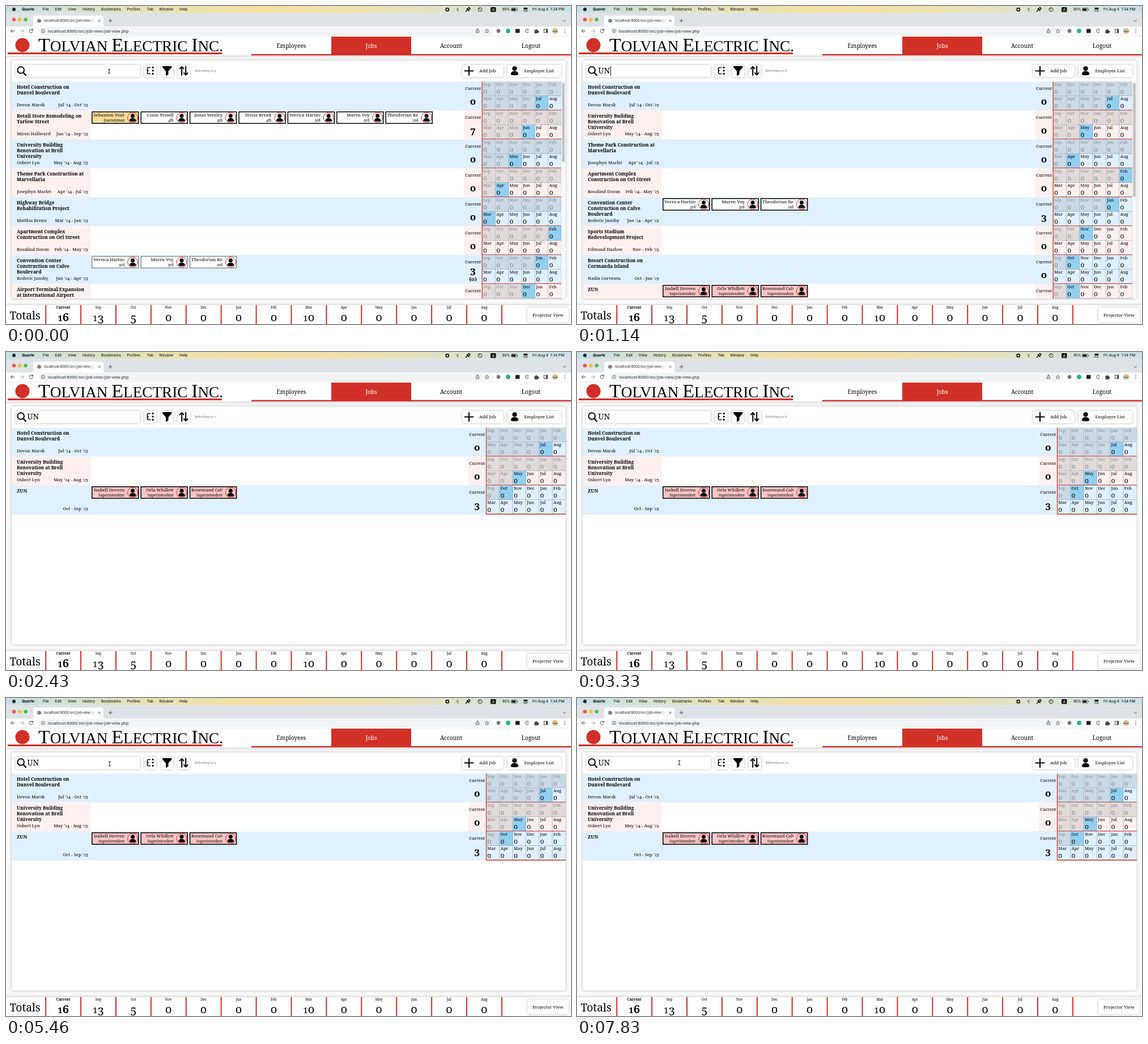
An HTML page that plays this animation: 997x561 px, repeating every 8 s.

```html
<!DOCTYPE html>
<html lang="en">
<head>
<meta charset="utf-8">
<title>Job view</title>
<style>
html, body { margin: 0; width: 100%; height: 100%; overflow: hidden; background: #fff; }
svg { display: block; }
#stage { width: 100vw; height: 100vh; font-family: "Noto Serif", serif; }
text { white-space: pre; }
.ui { font-family: Inter, sans-serif; }
.url { font-family: Roboto, sans-serif; }
.brand { font-family: "Liberation Serif", serif; }
.b { font-weight: 700; }
.soft { filter: drop-shadow(0 0 2px rgba(0,0,0,.28)); }
.line { fill: none; stroke: #000; stroke-linecap: round; stroke-linejoin: round; }
.grey { stroke: #444; }
</style>
</head>
<body>
<svg id="stage" viewBox="0 0 997 561"></svg>
<script>
const RED = '#d03027', LOOP = 8000, ROW = 51, TOP = 133.5;
const MONTHS = 'Sep Oct Nov Dec Jan Feb Mar Apr May Jun Jul Aug'.split(' ');

const stage = document.getElementById('stage');
const rect = (x, y, w, h, fill, more = '') =>
  `<rect x="${x}" y="${y}" width="${w}" height="${h}" fill="${fill}" ${more}/>`;
const dot = (x, y, r, fill, more = '') =>
  `<circle cx="${x}" cy="${y}" r="${r}" fill="${fill}" ${more}/>`;
const line = (d, w = 1, color = '#000') =>
  `<path class="line" d="${d}" style="stroke:${color};stroke-width:${w}"/>`;
const text = (x, y, s, size, more = '') =>
  `<text x="${x}" y="${y}" font-size="${size}" ${more}>${s}</text>`;
const MID = 'text-anchor="middle"', END = 'text-anchor="end"', BOLD = 'class="b"', INK = '#444';

// old-style figures: 0-2 at x-height, 3 4 5 7 9 hang below the baseline
const old = s => String(s).replace(/\d/g, d =>
  d === '0' ? 'o'
  : d < 3 ? `<tspan font-size="76%">${d}</tspan>`
  : d === '6' || d === '8' ? d
  : `<tspan baseline-shift="-.18em">${d}</tspan>`);

// title lines, owner, dates, first month, crew, shared crew
const MIXED = ['Verrica Hartinson,3rd', 'Maren Voy,3rd', 'Theodorian Kelmar,2nd'];
const job = (title, owner, dates, start, crew = [], shared = false) =>
  ({ title, owner, dates, start, crew, shared });
const jobs = [
  job('Hotel Construction on|Dunvel Boulevard', 'Devon Marsk', "Jul '24 - Oct '25", 10),
  job('Retail Store Remodeling on|Tarlow Street', 'Miren Hallward', "Jun '24 - Sep '25", 9,
    ['Sebastien Venlow,Journeyman', 'Corin Tessell,4th', 'Jonas Wexley,4th', 'Tessia Brenk,4th', ...MIXED]),
  job('University Building|Renovation at Brell|University', 'Osbert Lyn', "May '24 - Aug '25", 8),
  job('Theme Park Construction at|Marvellaria', 'Josephyn Marlet', "Apr '24 - Jul '25", 7),
  job('Highway Bridge|Rehabilitation Project', 'Matthis Brenn', "Mar '24 - Jun '25", 6),
  job('Apartment Complex|Construction on Orl Street', 'Rosalind Doran', "Feb '24 - May '25", 5),
  job('Convention Center|Construction on Calve|Boulevard', 'Roderic Jansby', "Jan '24 - Apr '25", 4, MIXED, true),
  job('Airport Terminal Expansion|at International Airport', '', '', 3),
  job('Sports Stadium|Redevelopment Project', 'Edmond Harlow', "Nov - Feb '25", 2),
  job('Resort Construction on|Cormanda Island', 'Nadia Corventa', "Oct - Jan '25", 1),
  job('ZUN', '', "Oct - Sep '25", 1,
    ['Isabell Droven,Superintendent', 'Orla Whillett,Superintendent', 'Rosemund Calvier,Superintendent'])
];

const person = (x, y, k) =>
  `<g transform="translate(${x} ${y}) scale(${k})">` + dot(0, -3, 3.9, '#000') +
  '<path d="M-6.4 7.2C-6.4 3 -4 1.4 0 1.4S6.4 3 6.4 7.2Q0 9.6 -6.4 7.2Z"/></g>';

const card = (entry, i, y, dashed) => {
  const [name, role] = entry.split(',');
  const x = 151.8 + 86.4 * i;
  const fill = role === 'Journeyman' ? '#f8dc9b' : role === 'Superintendent' ? '#fcc5c5' : '#fff';
  const long = name.length > 14;
  return rect(x, y, 82, 20.4, fill, `stroke="#000" stroke-width="${dashed ? 1 : 1.5}" ${dashed ? 'stroke-dasharray="1.5 1"' : ''}`) +
    `<svg x="${x + 2}" y="${y}" width="55.5" height="20">` +
    text(long ? .5 : 55.5, 8.4, name, 7.8, long ? '' : END) +
    text(55.5, 17.7, old(role), 6.2, END) + '</svg>' +
    dot(x + 71.8, y + 10.2, 9, 'none', 'stroke="#c8342c" stroke-width="1"') +
    person(x + 71.8, y + 9.8, .9);
};

const months = (x, y, start, blue) => MONTHS.map((m, i) => {
  const cx = x + i % 6 * 23.3, cy = y + (i > 5 ? 25 : 0);
  const past = i < start;
  const fill = i === start ? '#93cff0' : past ? (blue ? '#cbd9e5' : '#e2d9d9') : 'none';
  const ink = `fill="${past ? '#858b90' : '#000'}"`;
  return rect(cx, cy, 23.3, 25, fill, 'stroke="#8c9aa6" stroke-opacity=".55" stroke-width=".6"') +
    text(cx + 1.8, cy + 7.8, m, 7.6, ink) + text(cx + 1.8, cy + 21.8, old(0), 12, ink);
}).join('');

const jobRow = (j, i, right, all) => {
  const y = TOP + ROW * i, blue = i % 2 === 0;
  const side = blue ? '#e0f0fe' : '#fdf0ef', gx = right - 139.8;
  const dashed = j.shared && all;
  const count = (dy, s, size) => text(gx - 16.2, y + dy, old(s), size, MID + ' ' + BOLD);
  return rect(10, y, right - 10, ROW, blue ? side : '#fff') +
    rect(10, y, 139, ROW, side) + rect(gx - 32, y, right - gx + 32, ROW, side) +
    j.title.split('|').map((s, n) => text(19, y + 12.5 + 10 * n, s, 8.3, BOLD)).join('') +
    text(19, y + 43.5, j.owner, 7.8) + text(144.7, y + 43.5, old(j.dates), 7.9, END) +
    j.crew.map((c, n) => card(c, n, y + 2.2, dashed)).join('') +
    text(gx - 16.2, y + 14, 'Current', 7.5, MID) +
    (dashed ? count(32.7, j.crew.length, 17) + count(45, '(0)', 9.5) : count(40, j.crew.length, 17)) +
    months(gx, y, j.start, blue) +
    line(`M${gx} ${y}v${ROW - .5}H${right}`, 1.3, '#cf3b33');
};

const list = query => {
  const found = jobs.filter(j => j.title.toUpperCase().includes(query));
  const full = found.length > 7, right = full ? 980 : 987.3;
  return `<g id="list${query}" transform="translate(0 ${TOP})"><svg width="997" height="382.5" viewBox="0 ${TOP} 997 382.5">` +
    found.map((j, i) => jobRow(j, i, right, !query)).join('') +
    (full ? rect(980, TOP, 7.5, 383, '#f7f7f7') + rect(981.3, 135.5, 4.6, query ? 201 : 140, '#c2c2c2', 'rx="2.3"') : '') +
    '</svg></g>';
};

const menuBar = () => {
  const items = [['File', 65], ['Edit', 86.5], ['View', 109], ['History', 135], ['Bookmarks', 168],
    ['Profiles', 213.5], ['Tab', 248.5], ['Window', 270], ['Help', 306]];
  return rect(0, 0, 997, 12.5, 'url(#sky)') + dot(14, 6, 3, '#111') +
    text(28, 8.4, 'Quorle', 6.7, 'class="ui b"') +
    items.map(([s, x]) => text(x, 8.4, s, 6.6, 'class="ui"')).join('') +
    rect(775.5, 3, 6.5, 6.5, '#111', 'rx="1.8"') + dot(778.8, 6.2, 1.6, '#fff') +
    line('M798 3.5l-2.2 2.7 2.2 2.7', .9) +
    line('M811.5 9.5l3-3M813 4.5l4 4M814.5 5l2.5-2.5 2 2L816.5 7', 1.4) +
    dot(836.5, 6.2, 3.4, 'none', 'stroke="#111" stroke-width=".9"') + line('M836.5 6.2l-1.5-1.8', .9) +
    rect(855, 2, 9.5, 8.5, '#111', 'rx="1.5"') + text(859.8, 8.7, 'A', 6.8, 'class="ui" fill="#fff" ' + MID) +
    text(876, 8.4, '80%', 6.1, 'class="ui"') +
    rect(891.5, 3.5, 10, 5.5, 'none', 'rx="1.5" stroke="#333" stroke-width=".7"') +
    rect(892.5, 4.5, 6.8, 3.5, '#111', 'rx=".7"') + rect(902.2, 5.2, .9, 2, '#333') +
    rect(913, 3, 7.5, 2.8, '#111', 'rx="1.4"') +
    rect(913.3, 7, 7, 2.4, 'none', 'rx="1.2" stroke="#111" stroke-width=".7"') +
    text(929, 8.4, 'Fri Aug 4  1:34 PM', 6.5, 'class="ui"');
};

const browser = () =>
  rect(0, 12.5, 997, 24, '#dfe2e6') +
  ['#f0574e', '#f5bd3c', '#4fc04a'].map((c, i) => dot(14 + 10.3 * i, 24, 3.3, c)).join('') +
  '<path d="M44 36.5Q48 36.5 48 32V21Q48 17 52 17H168Q172 17 172 21V32Q172 36.5 176 36.5Z" fill="#fff"/>' +
  dot(58.5, 26, 3.3, '#5f6368') + line('M56 25l2 1 0 1.8M59 23.5l1.5 1.5', .8, '#fff') +
  '<svg x="67" y="18" width="90" height="16">' + text(0, 10.2, 'localhost:8000/src/job-view/job-view.php', 6.6, 'class="url" fill="#333"') +
  rect(78, 0, 12, 16, 'url(#fade)') + '</svg>' +
  line('M163 24.4l3.4 3.4M166.4 24.4l-3.4 3.4', .8, INK) +
  line('M181.2 26h6M184.2 23v6', .9, INK) +
  line('M983 25l2.3 2.3 2.3-2.3', .9, INK) +
  rect(0, 36.5, 997, 17, '#fff') + rect(58, 37.5, 801, 13.5, '#f1f3f4', 'rx="6.7"') +
  line('M15 44H8.6M11.5 41L8.5 44l3 3', 1, INK) +
  line('M25 44h6.4M28.5 41l3 3-3 3', 1, '#aaa') +
  line('M47 42.2a3.2 3.2 0 1 0 .4 2.8M47.4 40.4v2.2h-2.2', 1, INK) +
  dot(65.5, 44, 3.1, 'none', 'stroke="#555" stroke-width=".8"') + line('M65.5 43.8v1.8M65.5 42.3v.1', .8, '#555') +
  text(74, 46.5, 'localhost:8000/src/job-view/job-view.php', 7.75, 'class="url" fill="#333"') +
  line('M829.5 43v4h5v-4M832 45.4v-5M830.3 41.8l1.7-1.7 1.7 1.7', .8, INK) +
  line('M848.5 40.8l1 2.2 2.4.3-1.8 1.6.5 2.4-2.1-1.2-2.1 1.2.5-2.4-1.8-1.6 2.4-.3z', .7, INK) +
  dot(869, 44, 3.4, '#777') + dot(886, 44, 3.9, '#1fb58a') + rect(899, 40.5, 7.5, 7, '#222', 'rx="1"') +
  line('M921.5 41.2a3.2 3.2 0 1 0 .7 4.8M920 44l2-1.5', 1, INK) +
  `<path d="M932.5 42.2h2a1.3 1.3 0 1 1 2.6 0h1.8v2a1.3 1.3 0 1 1 0 2.4v1.6h-6.4z" fill="${INK}"/>` +
  rect(949.3, 41, 6.4, 6, 'none', `stroke="${INK}"`) + rect(953, 41, 2.7, 6, INK) +
  dot(969, 44, 5.3, '#d9c29a') + rect(964.5, 43.8, 9, 2, '#8d7656', 'rx="1"') +
  [41, 44, 47].map(y => dot(986, y, .8, INK)).join('');

const header = () =>
  rect(0, 53.5, 997, 34, '#fff', 'style="filter:drop-shadow(0 1px 2px rgba(0,0,0,.2))"') +
  dot(29, 69, 12.5, RED) + rect(3, 82, 378, 3.2, RED) +
  text(57, 80, ['T|olvian ', 'E|lectric ', 'I|nc.'].map(w => {
    const [cap, rest] = w.split('|');
    return `<tspan font-size="34">${cap}</tspan>${rest.toUpperCase()}`;
  }).join(''), 27.2, 'class="brand"') +
  rect(433, 84.8, 564, 2.4, RED) + rect(574, 54, 141, 33, RED) +
  ['Employees', 'Jobs', 'Account', 'Logout'].map((s, i) =>
    text(503.5 + 141 * i, 73.8, s, 10.1, `${MID} fill="${i === 1 ? '#fff' : '#000'}"`)).join('');

const button = (x, w) => rect(x, 104, w, 21.5, '#fff', 'rx="2" class="soft"');

const tools = () =>
  rect(10, 96, 977.5, 420, '#fff', 'rx="2" class="soft"') +
  button(16.5, 219.5) + button(244, 21.5) + button(273.7, 21.5) + button(303, 21.5) +
  button(805, 72.5) + button(885, 94.5) +
  dot(26.2, 113, 5.8, 'none', 'stroke="#000" stroke-width="2"') + line('M30.6 117.6l4.4 4.6', 2.3) +
  line('M254.5 108.5h-3q-2 0-2 2v7q0 2 2 2h3M249.5 114h2', 1.6) +
  [108.5, 114, 119.5].map(y => rect(257.6, y - 1.4, 3, 2.8, '#000', 'rx=".9"')).join('') +
  '<path d="M276.5 106.5h15.5v1.7l-6 6.8v5.5l-3.5 2.3v-7.8l-6-6.8z" stroke="#000" stroke-linejoin="round"/>' +
  line('M310.2 122V107M306.8 110.6l3.4-3.7 3.4 3.7M317.2 106.5v15M313.9 118l3.3 3.6 3.3-3.6', 2) +
  line('M809.5 114.5h15M817 107v15', 2.1) + text(835, 117.3, 'Add Job', 7.9) +
  person(897.5, 113.5, 1.05) + text(914.5, 117.3, 'Employee List', 7.8);

const totals = () => {
  const counts = [16, 13, 5, 0, 0, 0, 0, 10, 0, 0, 0, 0, 0];
  return rect(0, 527.5, 997, 40, '#fff', 'class="soft"') + text(6.5, 553, 'Totals', 19.3) +
    ['Current', ...MONTHS].map((m, i) => {
      const x = 101 + 61.9 * i, style = MID + (i ? '' : ' ' + BOLD);
      return text(x, 534.4, m, 6.2, style) + text(x, 556, old(counts[i]), 20, style);
    }).join('') +
    Array.from({ length: 14 }, (_, i) => rect(69.2 + 61.9 * i, 527.5, 2, 34, RED)).join('') +
    rect(920, 532, 73, 26, '#fff', 'rx="2" class="soft"') + text(956.5, 547.5, 'Projector View', 7.8, MID);
};

const gradient = (id, ...stops) => `<linearGradient id="${id}">` + stops.map(([at, color]) =>
  `<stop offset="${at}" stop-color="${color}"/>`).join('') + '</linearGradient>';

stage.innerHTML =
  '<defs>' + gradient('sky', [0, '#c6e0e6'], [.25, '#e6e2b8'], [.45, '#f3e1a2'], [.65, '#ece2b4'], [1, '#cbe2ea']) +
  gradient('fade', [0, 'rgba(255,255,255,0)'], [1, '#fff']) + '</defs>' +
  rect(0, 0, 997, 561, '#fafafa') + menuBar() + browser() + header() + tools() +
  list('') + list('U') + list('UN') + totals() +
  text(333, 116.2, '', 5.2, 'id="timer" fill="#777"') +
  text(37.5, 119.3, '', 14, 'id="typed"') +
  rect(0, 106, 1, 17, '#000', 'id="caret"') +
  `<g id="mouse">${line('M-1.6 -4q1.6 0 1.6 1V3q0 1 -1.6 1M1.6 -4q-1.6 0 -1.6 1M0 3q0 1 1.6 1', .9)}</g>`;

const el = id => document.getElementById(id);
const show = (node, on) => { node.style.display = on ? '' : 'none'; };
const put = (node, html) => { if (node.last !== html) node.innerHTML = node.last = html; };
const lists = ['', 'U', 'UN'].map(q => [q, el('list' + q)]);
const timer = el('timer'), typed = el('typed'), caret = el('caret'), mouse = el('mouse');
const ease = (t, a, b) => { const k = Math.min(1, Math.max(0, (t - a) / (b - a))); return k * k * (3 - 2 * k); };

const caretOn = t => t < 840 ? t >= 30 && t < 480 : t < 1530 || (t - 1530) % 900 >= 450;

const render = t => {
  const query = t < 1140 ? '' : t < 1380 ? 'U' : 'UN';
  lists.forEach(([q, node]) => show(node, q === query));

  const word = t < 840 ? '' : t < 1080 ? 'U' : 'UN';
  put(typed, word);
  caret.setAttribute('x', [38, 48.5, 59][word.length]);
  show(caret, caretOn(t));

  const left = t < 870 ? 9 : t < 7170 ? 8 - Math.floor((t - 870) / 900) : 10;
  put(timer, 'Refreshing in ' + old(left));

  show(mouse, t < 840 || t >= 5160);
  const k = ease(t, 5600, 6030);
  const [x, y] = t < 840 ? [182, 115.3] : [183 - 2.7 * k, 116 - 1.7 * k];
  mouse.setAttribute('transform', `translate(${x} ${y})`);
};

const tick = () => {
  render(performance.now() % LOOP);
  requestAnimationFrame(tick);
};
tick();
</script>
</body>
</html>
```
